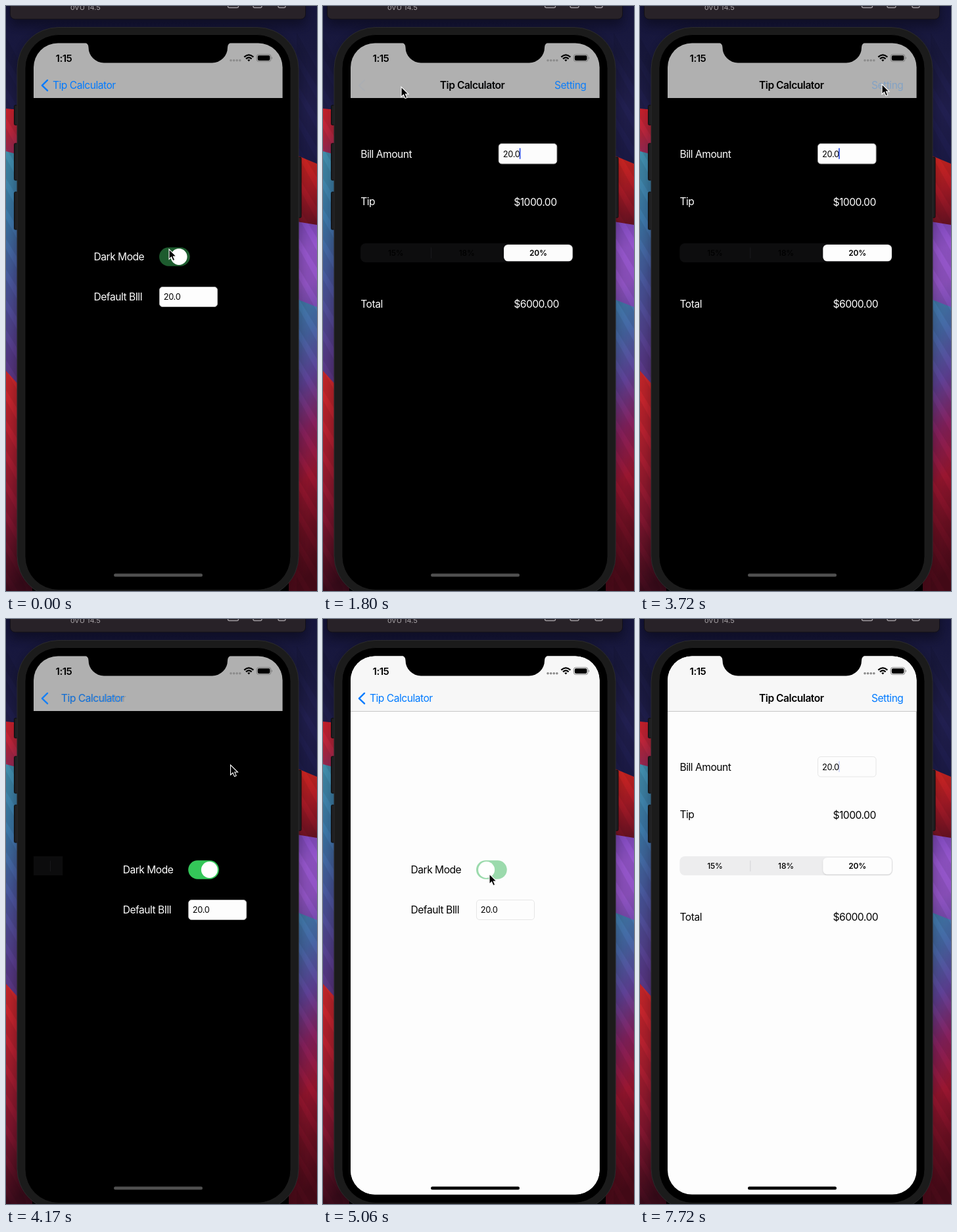
These frames come from a looping animation (473 by 890 pixels, 7820 ms). An HTML page:

```html
<!DOCTYPE html>
<html lang="en">
<head>
<meta charset="utf-8">
<title>Tip Calculator</title>
<style>
  html, body { margin: 0; width: 100%; height: 100%; overflow: hidden; background: #000; }
  svg { display: block; width: 473px; height: 890px; }
  text { font: 400 15.56px Inter, "Liberation Sans", sans-serif; letter-spacing: -.03em; white-space: pre; }
  .bold { font-weight: 600; }
  .clock { font-size: 15px; font-weight: 600; }
  .input { font-size: 12.8px; letter-spacing: -.025em; }
  .seg { font-size: 11.9px; font-weight: 500; letter-spacing: -.01em; text-anchor: middle; }
  .seg.bold { font-weight: 600; }
  .device { font-size: 11px; letter-spacing: 0; fill: #a39ea2; }
  .blue { fill: #007aff; }
  svg { --page: #000; --ink: #fff; --bar: #b0b0b0; --line: #000; --home: #505050;
        --track: #0d0d0e; --divider: #1b1b1d; --edge: #b4b4b4; }
  svg.light { --page: #fdfdfd; --ink: #000; --bar: #f7f7f7; --line: #c6c6c6; --home: #000;
        --track: #ededee; --divider: #d3d3d6; --edge: #e6e6e6; }
  .page { fill: var(--page); }
  .ink { fill: var(--ink); }
  .field { fill: #fdfdfd; stroke: var(--edge); }
</style>
</head>
<body>
<svg id="stage" viewBox="0 0 473 890">
  <defs>
    <clipPath id="screen"><rect x="42" y="56.5" width="378.6" height="819" rx="37"/></clipPath>
    <clipPath id="content"><rect x="42" y="140" width="379" height="740"/></clipPath>
    <filter id="soft" x="-10%" y="-30%" width="120%" height="170%">
      <feDropShadow dx="0" dy="1" stdDeviation="1.2" flood-opacity=".16"/>
    </filter>
    <filter id="blur" x="-10%" y="-60%" width="120%" height="220%">
      <feGaussianBlur stdDeviation="9"/>
    </filter>
  </defs>

  <g id="wallpaper"></g>
  <rect x="6" y="-20" width="450" height="50" fill-opacity=".4" filter="url(#blur)"/>
  <rect x="17" y="36" width="428" height="870" rx="63" fill-opacity=".3" filter="url(#blur)"/>

  <!-- simulator toolbar -->
  <rect x="6.5" y="-20" width="449" height="40" rx="7" fill="#282228" stroke="#121018"/>
  <text class="device" x="98" y="6">oVU 14.5</text>
  <g fill="none" stroke="#a39ea2" stroke-width="1.3">
    <rect x="337.5" y="-8" width="16" height="10.5" rx="2"/>
    <rect x="376" y="-8" width="13" height="10.5" rx="2"/>
    <path d="M382.5-4V0"/>
    <rect x="414" y="-8" width="11" height="10.5" rx="2"/>
  </g>

  <!-- phone body -->
  <g fill="#1e1e20" stroke="#0b0b0c">
    <rect x="12.5" y="151" width="7" height="30" rx="1.5"/>
    <rect x="12.5" y="209" width="7" height="56" rx="1.5"/>
    <rect x="12.5" y="283" width="7" height="57" rx="1.5"/>
    <rect x="442" y="230" width="7" height="92" rx="1.5"/>
  </g>
  <rect x="17" y="32.5" width="428" height="867" rx="63" fill="#1b1b1b" stroke="#2b2b2d"/>
  <rect x="29" y="43.5" width="404" height="845" rx="51" fill="#000" stroke="#252525" stroke-width=".7"/>

  <g clip-path="url(#screen)">
    <rect class="page" x="42" y="56" width="379" height="821"/>
    <g clip-path="url(#content)">
      <g id="calc">
        <text class="ink" x="60.5" y="231">Bill Amount</text>
        <rect class="field" x="270.5" y="209.5" width="88.5" height="30.5" rx="4.5"/>
        <text class="input" x="277" y="229.7">20.0</text>
        <rect id="caret" x="302" y="216" width="1.8" height="17" rx=".9" fill="#3a5be8"/>
        <text class="ink" x="60.5" y="302.5">Tip</text>
        <text class="ink" x="293.5" y="304">$1000.00</text>
        <rect x="60.3" y="361" width="324" height="29" rx="8" fill="var(--track)"/>
        <rect x="167.3" y="367.5" width="1" height="16.5" fill="var(--divider)"/>
        <rect x="278.3" y="363" width="104.6" height="25.3" rx="6.4" fill="#fdfdfd" filter="url(#soft)"/>
        <text class="seg" x="114" y="380">15%</text>
        <text class="seg" x="222" y="380">18%</text>
        <text class="seg bold" x="330.6" y="380">20%</text>
        <text class="ink" x="60.5" y="459.3">Total</text>
        <text class="ink" x="293.5" y="459.3">$6000.00</text>
      </g>
      <rect id="dim" x="42" y="140" width="379" height="737"/>
      <g id="settings">
        <rect class="page" x="42" y="140" width="379" height="737"/>
        <text class="ink" x="133.5" y="387.3">Dark Mode</text>
        <rect id="track" x="233" y="367.3" width="46.7" height="28.4" rx="14.2"/>
        <circle id="knob" cy="381.5" r="12.5" fill="#fff"/>
        <text class="ink" x="133.5" y="448.3">Default BIll</text>
        <rect class="field" x="233.5" y="427.5" width="88" height="30" rx="4.5"/>
        <text class="input" x="239.7" y="447">20.0</text>
      </g>
    </g>

    <!-- bars -->
    <rect x="42" y="56" width="379" height="84" fill="var(--bar)"/>
    <rect x="42" y="140" width="379" height="1" fill="var(--line)"/>
    <path id="chevron" d="M63 112.9L54.9 120.8L63 128.7" fill="none" stroke="#007aff"
          stroke-width="2.4" stroke-linecap="round" stroke-linejoin="round"/>
    <text id="back" class="blue" y="126.2">Tip Calculator</text>
    <text id="title" class="bold" y="126.2">Tip Calculator</text>
    <text id="setting" class="blue" x="352" y="126.2">Setting</text>
    <text class="clock" x="75.5" y="84.5">1:15</text>
    <g id="dots" fill="#8b8b8b"></g>
    <g fill="none" stroke="#000" stroke-width="2.2">
      <path d="M362.3 77.6Q369.3 71 376.3 77.6M365 80.4Q369.3 76.4 373.6 80.4"/>
      <path d="M367.2 82L369.3 84.4L371.4 82Q369.3 80.4 367.2 82Z" fill="#000" stroke="none"/>
    </g>
    <rect x="381.3" y="73.8" width="21.6" height="10.6" rx="3" fill="none" stroke="#777" stroke-width=".9"/>
    <rect x="382.8" y="75.3" width="18.6" height="7.6" rx="1.8"/>
    <path d="M404 77.3Q406 79.1 404 80.9Z" fill="#777"/>
    <rect x="164" y="863.6" width="135" height="4.7" rx="2.3" fill="var(--home)"/>
  </g>
  <path d="M119 55.5Q125.5 56.5 125.5 63A23.5 23.5 0 0 0 149 86.5H313.5A23.5 23.5 0 0 0 337 63Q337 56.5 343.5 55.5Z"/>

  <path id="cursor" d="M0 0V15.2L3.5 12L6 17.6L8.7 16.4L6.3 11H11Z" fill="#000" stroke="#fff" stroke-width="1.1"/>
</svg>

<script>
const LOOP = 7820, STEP = 148;
const POP_DARK = 1400, PUSH = 3890, GO_LIGHT = 4900, POP_LIGHT = 5700;
const $ = id => document.getElementById(id);
const clamp = v => Math.max(0, Math.min(1, v));
const mix = (a, b, k) => a + (b - a) * k;
const show = (id, opacity) => $(id).setAttribute('opacity', opacity.toFixed(3));
const shift = (id, x) => $(id).setAttribute('transform', `translate(${x.toFixed(2)} 0)`);

// Wallpaper bands: outline, then colours from top to bottom
const bands = [
  ['0,0 473,0 473,260 0,260', '#15153c', '#19193f', '#211f50', '#1b1a48'],
  ['0,156 30,159 30,240 0,240', '#d4212c', '#b5263f', '#8c2c66'],
  ['0,221 30,229 30,640 0,640', '#4190ac', '#3c78a8', '#4a559c', '#583c8c', '#5c2a70'],
  ['0,555 17,574 40,600 40,890 0,890', '#d2282a', '#b21f30', '#841630', '#3c0b1b'],
  ['430,222 473,240 473,350 430,350', '#d6281f', '#a81a26', '#5e1022'],
  ['430,326 473,333 473,480 430,480', '#7a46b8', '#9556cc', '#9154c4', '#7048a8'],
  ['430,441 473,458 473,890 430,890', '#4088b2', '#4668a6', '#5f4298', '#85205c', '#9a1630', '#6c0f22', '#480a18']
];
$('wallpaper').innerHTML = bands.map(([points, ...colors], i) => {
  const stops = colors.map((c, k) => `<stop offset="${k / (colors.length - 1)}" stop-color="${c}"/>`).join('');
  return `<linearGradient id="band${i}" x2="0.08" y2="1">${stops}</linearGradient>
    <polygon points="${points}" fill="url(#band${i})"/>`;
}).join('');
// Faint slanted folds over the bands
for (let y = 40; y < 890; y += 46) {
  const fold = x => `M${x} ${y}l34 62v26l-34-56z`;
  $('wallpaper').insertAdjacentHTML('beforeend', `<path d="${fold(-4)}${fold(442)}" fill-opacity=".08"/>`);
}
$('dots').innerHTML = [342, 346.6, 351.2, 355.8].map(x => `<circle cx="${x}" cy="82.7" r="1.8"/>`).join('');

// Pointer stops: time, x, y
const pointer = [
  [0, 248, 370], [800, 248, 370], [1300, 119, 123], [1850, 119, 123], [2500, 368, 119],
  [3880, 368, 119], [4154, 341.5, 222], [4600, 253, 388], [5180, 253, 388],
  [5540, 119, 124], [6000, 119, 124], [6226, 167, 164], [6500, 320, 420]
];

function pointerAt(t) {
  const i = pointer.findIndex(p => p[0] > t);
  if (i < 0) return null;
  const [a, b] = [pointer[i - 1], pointer[i]];
  const k = (t - a[0]) / (b[0] - a[0]), e = k * k * (3 - 2 * k);
  return [mix(a[1], b[1], e), mix(a[2], b[2], e)];
}

// Critically damped spring, 0 to 1
function spring(ms) {
  const u = Math.max(0, ms) * .014;
  return 1 - (1 + u) * Math.exp(-u);
}

// 0 = calculator, 1 = settings
function pageAt(t) {
  if (t < PUSH) return 1 - spring(t - POP_DARK);
  return t < POP_LIGHT ? spring(t - PUSH) : 1 - spring(t - POP_LIGHT);
}

// Holds, fades out, then returns once a second
function caretAt(t) {
  const phase = (t + (t < PUSH ? 600 : 60)) % 1000;
  if (phase < 450) return 1;
  return phase < 860 ? 1 - (phase - 450) / 410 : (phase - 860) / 140;
}

function drawSwitch(t, light) {
  const since = t - (light ? GO_LIGHT : -95);
  const moved = 1 - Math.exp(-since / 50), tinted = clamp(since / 250);
  const on = light ? 1 - moved : moved, green = light ? 1 - tinted : tinted;
  const off = light ? [233, 233, 235] : [13, 13, 15];
  const rgb = [52, 199, 89].map((c, i) => Math.round(mix(off[i], c, green)));
  $('track').setAttribute('fill', `rgb(${rgb})`);
  $('knob').setAttribute('cx', mix(247.6, 265.2, on).toFixed(2));
}

function draw(t) {
  const light = t >= GO_LIGHT, p = pageAt(t);
  $('stage').classList.toggle('light', light);

  shift('calc', -113.6 * p);
  shift('settings', 379 * (1 - p));
  show('dim', .1 * p);
  show('caret', caretAt(t));
  drawSwitch(t, light);

  const pressedBack = (t > 1300 && t < POP_DARK) || (t > 5580 && t < POP_LIGHT);
  const pressedSetting = t > 3700 && t < PUSH;
  const titleX = mix(181, 71, p).toFixed(2);
  $('back').setAttribute('x', titleX);
  $('title').setAttribute('x', titleX);
  show('back', pressedBack ? .22 : p);
  show('chevron', pressedBack ? .25 : p);
  show('title', 1 - p);
  show('setting', pressedSetting ? .25 : clamp(1 - 2 * p));

  const at = pointerAt(t);
  show('cursor', at ? 1 : 0);
  if (at) $('cursor').setAttribute('transform', `translate(${at[0].toFixed(1)} ${at[1].toFixed(1)})`);
}

function tick(now) {
  const t = now % LOOP;
  draw(Math.max(0, Math.floor((t - 10) / STEP)) * STEP + 10);
  requestAnimationFrame(tick);
}
draw(10);
requestAnimationFrame(tick);
</script>
</body>
</html>
```
